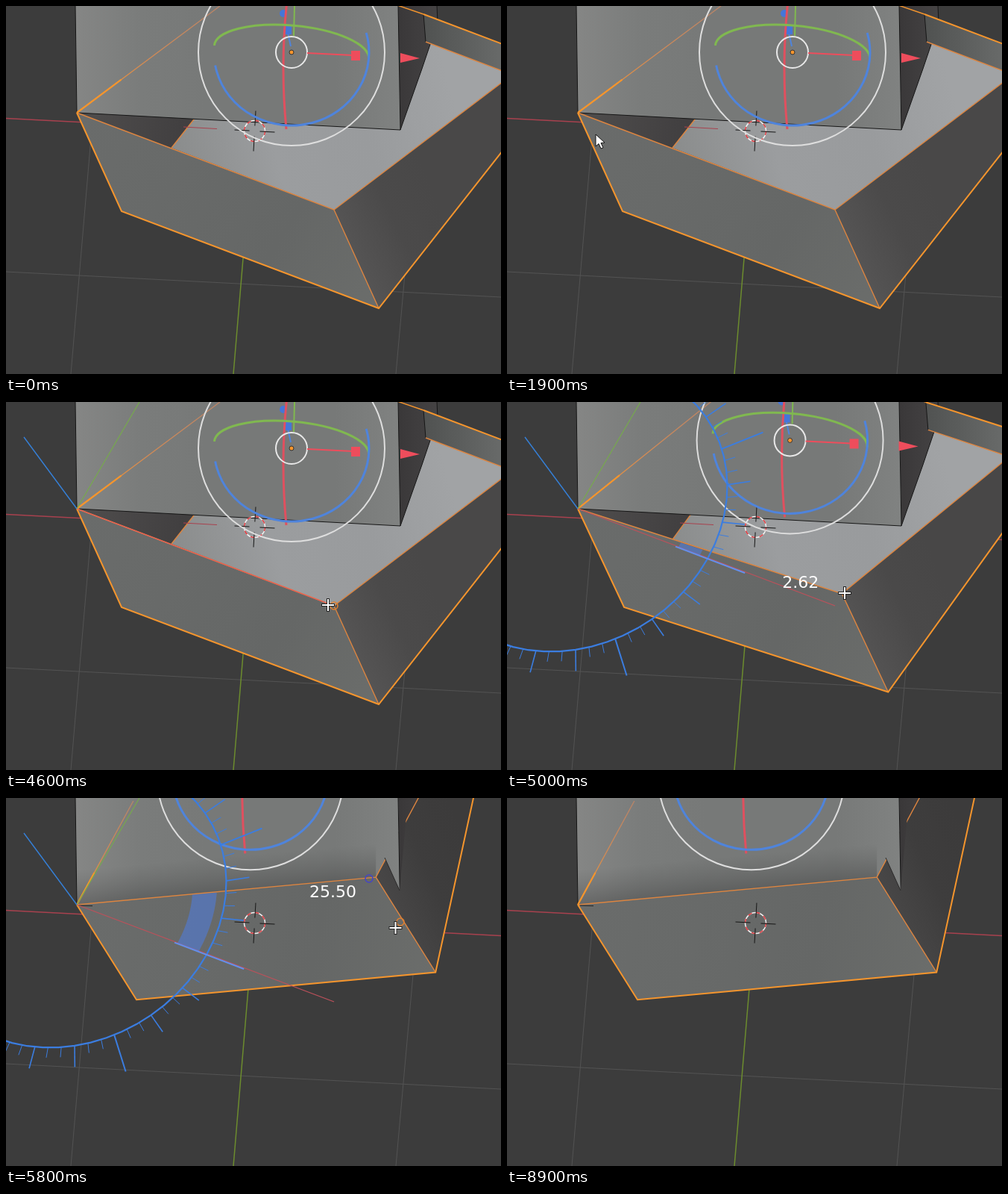
An HTML page with a canvas that plays this animation: 664x493 px, repeating every 9.4 s.

```html
<!DOCTYPE html>
<html>
<head>
<meta charset="utf-8">
<style>
html, body { margin: 0; overflow: hidden; background: #3c3c3c; }
canvas { display: block; }
</style>
</head>
<body>
<canvas id="stage" width="664" height="493"></canvas>
<script>
const ctx = document.getElementById('stage').getContext('2d');
const LOOP = 9400, STEP = 100, SNAP_ANGLE = 25.5;
const ORANGE = '#f5952d', THIN_ORANGE = '#dd8540', INK = '#161616', AXIS_RED = '#a8414e';
const RED = '#ee4d5c', BLUE = '#4f84dc', GREEN = '#80b850', DIAL = '#3b7de0';
const PIVOT = [95, 143], CORNER = [440, 273];

// Pointer moves: start, end, then the place reached
const MOVES = [
  [200, 750, 130, 176], [750, 900, 101, 136], [1300, 1700, 119, 172], [3000, 3300, 102, 158],
  [3600, 4500, 432, 272], [4900, 5200, 495, 224], [5200, 5800, 522.5, 174], [8500, 8800, 637, 74]
];

const progress = (t, from, to) => Math.min(1, Math.max(0, (t - from) / (to - from)));
const mix = (a, b, k) => a.map((v, i) => v + (b[i] - v) * k);
const add = (a, b) => a.map((v, i) => v + b[i]);
const gray = v => `rgb(${v},${v - 1},${v - 1})`;

function pointerAt(t) {
  return MOVES.reduce((p, [from, to, ...end]) => mix(p, end, progress(t, from, to)), [523, 0]);
}
function angleAt(t) {
  return t >= 5700 ? SNAP_ANGLE : Math.max(0, t - 4900) * .0262;
}

// The plane of rotation on screen: a unit circle seen at a slant
function turn(deg, r = 1) {
  const a = deg * Math.PI / 180, c = r * Math.cos(a), s = r * Math.sin(a);
  return [179 * c + 101 * s, 68 * c - 180 * s];
}
const dial = (deg, r) => add([90, 142], turn(deg, r));

// Vertices start at x, y; along and across are their distances from the axis
function poseAt(angle) {
  const swing = (x, y, along, across) => {
    const [now, start] = [angle, 0].map(a => add(turn(a, along), turn(a + 90, across)));
    return [x + now[0] - start[0], y + now[1] - start[1]];
  };
  return {
    A: PIVOT,
    B: swing(155, 275, .085, -.205),
    C: swing(...CORNER, 1.99, -.05),
    D: swing(500, 405, 2.075, -.255),
    E: swing(762, 72, 2.255, 1.88),
    F: swing(679, 92, 1.71, 1.53),
    floorNear: swing(222, 190, .66, .31),
    floorFar: swing(252, 152, -.15, .64),
    wallFoot: swing(563, 48, 1.15, .39),
    wallTop: swing(560, 11, 1.15, .39),
    wallEnd: swing(690, 60, 1.9, 1.5),
    seam: swing(287, 0, -.225, 1.27),
    gizmo: swing(383, 62, .95, .92),
    label: swing(385.6, 253, 1.545, -.147)
  };
}

function trace(pts) {
  ctx.beginPath();
  pts.forEach(p => ctx.lineTo(p[0], p[1]));
}
function fill(pts, color) { trace(pts); ctx.closePath(); ctx.fillStyle = color; ctx.fill(); }
function stroke(color, width = 1) { ctx.strokeStyle = color; ctx.lineWidth = width; ctx.stroke(); }
function line(pts, color, width) { trace(pts); stroke(color, width); }
function ring(p, r, color, width = 1.5) {
  ctx.beginPath();
  ctx.arc(p[0], p[1], r, 0, 7);
  stroke(color, width);
}
function arc(rx, ry, tilt, from, to, color) {
  ctx.beginPath();
  ctx.ellipse(0, 0, rx, ry, tilt, from, to);
  stroke(color, 3);
}
function dot(p, r, color) {
  ctx.beginPath();
  ctx.arc(p[0], p[1], r, 0, 7);
  ctx.fillStyle = color;
  ctx.fill();
}
function shade(a, b, ...stops) {
  const g = ctx.createLinearGradient(...a, ...b);
  stops.forEach((c, i) => g.addColorStop(i / (stops.length - 1), c));
  return g;
}

function drawGrid() {
  ctx.fillStyle = '#3c3c3c';
  ctx.fillRect(0, 0, 664, 493);
  line([[0, 356], [664, 390]], '#535353');
  line([[87, 493], [115, 165]], '#535353');
  line([[523, 493], [552, 170]], '#535353');
  line([[0, 150.5], [664, 184.5]], AXIS_RED, 1.4);
  line([[305, 493], [333, 160]], '#6c8c2e', 1.5);
}

const FRONT = [[93, -1], [95, 143], [529, 166], [526, -1]];
const SIDE = [[529, 166], [558, 84], [579, 22], [578, -1]];

function drawUpperBox() {
  fill([FRONT[3], ...SIDE], shade([527, 0], [575, 0], '#3a3839', '#444243'));
  fill(FRONT, shade([94, 0], [528, 0], '#858685', '#7a7c7b', '#777978', '#777978', '#777978', '#808281'));
  line(FRONT, INK);
  line(SIDE, INK);
}

function drawLowerBox(p, angle, selected) {
  const outline = selected ? ORANGE : INK, inner = selected ? THIN_ORANGE : INK;
  const wide = selected ? 2 : 1, thin = selected ? 1.4 : 1;
  fill([p.floorNear, p.floorFar, p.wallFoot, p.F, p.C],
    shade([230, 190], [590, 90], '#8b8d8d', '#9b9d9f', '#999b9d', '#a1a3a5'));
  fill([p.A, p.floorFar, p.floorNear], shade([120, 150], [240, 170], '#4d4b4b', '#413f40'));
  line([p.floorNear, p.floorFar], inner, thin);
  const redStart = p.floorFar[0] - 14;
  line([[redStart, 162], [redStart + 45, 164.5]], AXIS_RED, 1.2);
  drawUpperBox();

  fill([p.wallTop, p.wallEnd, p.F, p.wallFoot], shade([560, 0], [664, 0], '#505251', '#686a69'));
  line([p.wallTop, p.wallFoot], INK);
  line([p.wallFoot, p.F], inner, thin);
  line([p.wallTop, p.wallEnd], outline, wide);
  if (selected) line([add(p.wallTop, [-35, -12]), p.wallTop], ORANGE, 1.4);

  const tone = Math.round(73 - angle * .5);
  fill([p.C, p.D, p.E, p.F], shade(p.C, add(p.C, [120, -55]), gray(tone + 12), gray(tone + 2), gray(tone)));
  fill([p.A, p.B, p.D, p.C], shade(p.A, p.D, '#6a6c6b', '#686a69', '#656766', '#6b6d6b'));
  if (angle > 8) {
    fill([p.A, p.C, add(p.C, [0, -50]), add(p.A, [0, -50])],
      shade(p.C, add(p.C, [-4, -45]), 'rgba(40,40,40,.3)', 'rgba(60,60,60,0)'));
  }
  line([p.A, p.C, p.F], inner, thin);
  line([p.C, p.D], inner, thin);
  line([p.A, p.B, p.D, p.E], outline, wide);

  // The upper box pokes out through the tilted side
  if (angle > 8) {
    const [left, tip, right] = [[508, 80], [528, 124], [537, 24]]
      .map(q => mix([528, 163], q, progress(angle, 8, SNAP_ANGLE)));
    ctx.save();
    trace([left, tip, right]);
    ctx.clip();
    drawUpperBox();
    ctx.restore();
    line([left, tip], '#2a2929');
    line([[98, 144], [116, 144.5]], '#222');
  }
  if (selected) {
    line([p.A, p.seam], shade(p.A, p.seam, ORANGE, '#d18a55', '#b88468'), 1.4);
    line([p.A, mix(p.A, p.seam, .31)], ORANGE, 2.2);
  } else {
    line(FRONT, ORANGE, 2);
    line(SIDE, ORANGE, 2);
  }
}

function drawWorldCursor() {
  ctx.save();
  ctx.translate(333.5, 167.5);
  ring([0, 0], 14, '#f2f2f2');
  ctx.setLineDash([5.5, 5.5]);
  ring([0, 0], 14, '#e0383e');
  ctx.setLineDash([]);
  ctx.rotate(.055);
  for (let i = 0; i < 4; i++) {
    line([[7, 0], [27, 0]], INK);
    ctx.rotate(Math.PI / 2);
  }
  ctx.restore();
}

function drawGizmo(center) {
  ctx.save();
  ctx.translate(...center);
  line([[3, -22], [5, -100]], GREEN, 2);
  line([[-1, -8], [-5, -26]], BLUE, 2);
  ctx.fillStyle = '#4576d8';
  ctx.fillRect(-11, -36, 11, 12);
  dot([-11, -52], 5, '#4576d8');
  ctx.beginPath();
  ctx.moveTo(-2, -100);
  ctx.quadraticCurveTo(-17, 0, -7, 103);
  stroke('#e0505f', 3);
  arc(104, 36, .087, Math.PI, 2 * Math.PI, GREEN);
  arc(104, 98, 0, -.27, Math.PI - .18, BLUE);
  ring([0, 0], 125, '#dedede', 2);
  ring([0, 0], 21, '#e8e8e8', 2);
  line([[21, 1], [82, 4]], RED, 2);
  ctx.fillStyle = RED;
  ctx.fillRect(80, -2, 12, 13);
  fill([[146, 1], [172, 8], [146, 14]], RED);
  dot([0, 0], 3, ORANGE);
  stroke('#333');
  ctx.restore();
}

function drawAxes(tip, k, rotating) {
  line([PIVOT, tip], rotating ? '#bd505a' : '#ee5a56', 1.3);
  line([PIVOT, [179, 0]], '#76aa4c', 1.2);
  line([PIVOT, mix([41, 36], [24, 47], k)], '#3580d8', 1.4);
}

function dialArc(from, to, r) {
  return Array.from({ length: 61 }, (_, i) => dial(from + (to - from) * i / 60, r));
}
function drawProtractor(angle, label) {
  fill([...dialArc(0, angle, .78), ...dialArc(angle, 0, .94)], 'rgba(80,125,220,.58)');
  line(dialArc(-180, 180, 1), DIAL, 2.2);
  for (let d = -180; d < 180; d += 5) {
    const [reach, width] = d % 45 === 0 ? [1.28, 2] : d % 15 === 0 ? [1.15, 1.6] : [1.07, 1];
    line([dial(d, d ? 1 : .76), dial(d, reach)], d ? DIAL : '#6490ec', width);
  }
  ctx.font = '22px "DejaVu Sans", sans-serif';
  ctx.textAlign = 'center';
  ctx.fillStyle = '#fff';
  ctx.fillText(angle.toFixed(2), label[0], label[1] + 8);
}

function drawPointer([x, y], cross) {
  ctx.save();
  ctx.translate(x, y);
  if (cross) {
    for (const [color, width, r] of [['#222', 4, 9], ['#fff', 2, 8]]) {
      line([[-r, 0], [r, 0]], color, width);
      line([[0, -r], [0, r]], color, width);
    }
  } else {
    fill([[0, 0], [0, 16], [4, 12.5], [7, 19], [10, 17.8], [7, 11.5], [12, 11]], '#fff');
    stroke('#111');
  }
  ctx.restore();
}

function draw(t) {
  const during = (from, to) => t >= from && t < to;
  const angle = angleAt(t), pose = poseAt(angle), pointer = pointerAt(t);
  const selected = !during(1100, 1800), rotating = during(4900, 8200);
  drawGrid();
  drawLowerBox(pose, angle, selected);
  drawWorldCursor();
  drawGizmo(selected ? pose.gizmo : [335.5, 25]);

  if (during(3500, 8200)) drawAxes(t < 4500 ? pointer : CORNER, progress(t, 3600, 4500), rotating);
  if (rotating) drawProtractor(angle, pose.label);
  if (during(3200, 3500)) ring(PIVOT, 5, '#e08030');
  if (during(4500, 4900)) ring(CORNER, 5, '#e08030');
  if (during(5700, 8200)) {
    ring([529, 166], 5, '#e08030');
    ring([487, 108], 5, '#4444c8');
  }
  if (during(200, 8900)) drawPointer(pointer, during(3000, 8300));
}

function tick(now) {
  draw(Math.floor(now % LOOP / STEP) * STEP);
  requestAnimationFrame(tick);
}
requestAnimationFrame(tick);
</script>
</body>
</html>
```
